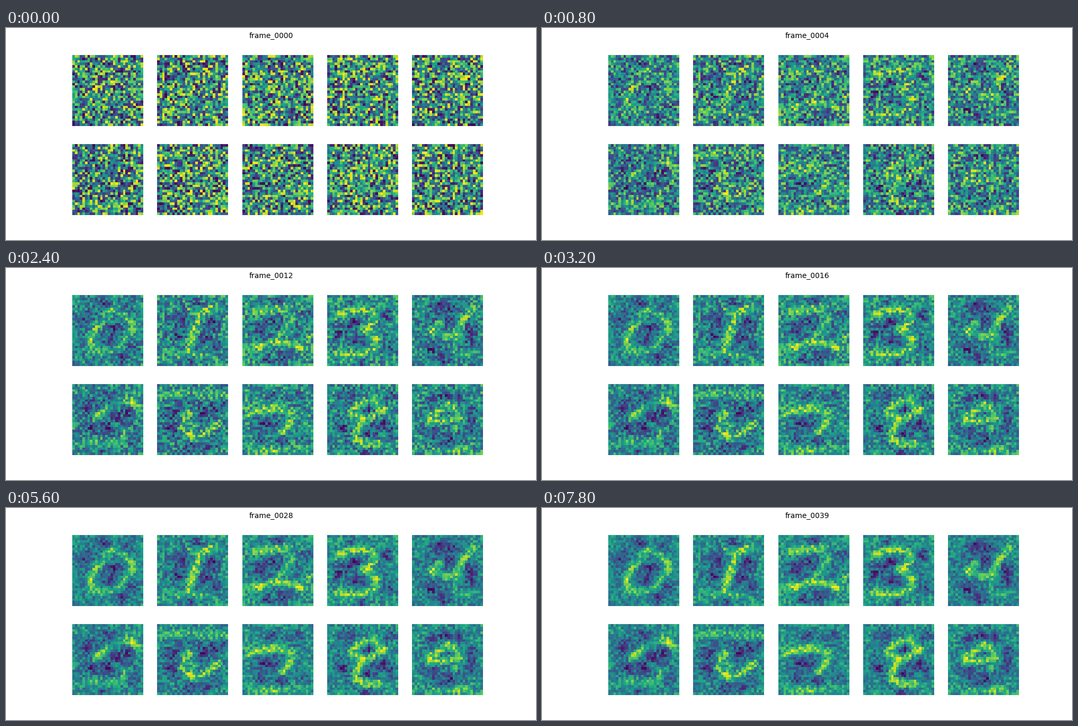
Write a matplotlib script that moves like this. It is 1000 by 400 pixels and loops after 8000 ms.

```python
import numpy as np
import matplotlib.pyplot as plt
from matplotlib.animation import FuncAnimation

SIZE = 28
FRAMES = 40
INTERVAL = 200

rng = np.random.default_rng(7)
gy, gx = np.mgrid[0:SIZE, 0:SIZE].astype(float)
window = np.exp(-(np.hypot(gx - 13.5, gy - 13.5) / 12.5) ** 6)
patterns = []


def segment_distance(p, q):
    """Distance of every cell to the segment p-q."""
    (x0, y0), (x1, y1) = p, q
    dx, dy = x1 - x0, y1 - y0
    t = ((gx - x0) * dx + (gy - y0) * dy) / (dx * dx + dy * dy)
    t = np.clip(t, 0, 1)
    return np.hypot(gx - x0 - t * dx, gy - y0 - t * dy)


def stroke(points, width=1.6):
    dist = np.min([segment_distance(p, q)
                   for p, q in zip(points, points[1:])], axis=0)
    return np.exp(-(dist / width) ** 2)


def blobs(points, radius):
    return np.max([np.exp(-((gx - x) ** 2 + (gy - y) ** 2) / radius ** 2)
                   for x, y in points], axis=0)


def add_digit(lines, hot, dark, faint=()):
    """Learned weights: bright strokes on a darker field."""
    lit = np.max([stroke(line) for line in lines]
                 + [0.65 * stroke(line) for line in faint], axis=0)
    hollow = 0.3 * window + 0.6 * blobs(dark, 2.5)
    patterns.append(0.62 * lit + 0.3 * blobs(hot, 1.9) - hollow * (1 - lit))


# 0
add_digit(
    lines=[[(15.5, 5), (19, 6.5), (23, 10.5), (23.4, 13), (21, 16), (17.5, 20.5),
            (12.5, 22.3), (7.5, 21.3), (6.5, 17.5), (8.2, 13.4), (11.5, 9.2),
            (15.5, 5)]],
    hot=[(23, 11), (6.8, 17), (7.5, 20.5)],
    dark=[(15.5, 13), (14.5, 17), (4, 8), (12, 2.5), (21, 3.5), (23, 21),
          (19, 24.5)])

# 1
add_digit(
    lines=[[(21, 4.6), (16.5, 6.5), (15.5, 10.3), (14.5, 14), (13, 17.6),
            (12, 21.8)]],
    faint=[[(12.5, 5), (16.5, 6)], [(7.5, 23.3), (17, 23)]],
    hot=[(14.8, 13.5), (13, 17.5)],
    dark=[(9, 10), (8, 15), (21.5, 10), (18.5, 16), (15, 2), (23, 20), (20, 12),
          (12, 26)])

# 2
add_digit(
    lines=[[(4, 6), (11, 5), (17.5, 4.5)],
           [(2.5, 19.5), (7, 20), (13, 17.5), (18, 18.5), (22.5, 20)]],
    faint=[[(17.5, 5), (19, 9), (16.5, 13.5), (13, 17)],
           [(22.5, 20), (26, 16)]],
    hot=[(22.5, 20.5), (6.5, 20), (10.5, 5)],
    dark=[(8, 12), (6, 12.5), (11.5, 11), (15.5, 24), (9, 25), (25.5, 8),
          (13, 1.5)])

# 3
add_digit(
    lines=[[(4, 7.5), (7, 5.8), (11.3, 5), (16.5, 6), (18.8, 8.5), (15.5, 12.5),
            (13.5, 13.2)],
           [(15.5, 13), (18.6, 16.5), (19, 19.6), (16.5, 22), (10.2, 23.3),
            (4.5, 21.8)]],
    hot=[(4.5, 22), (10.5, 5), (15, 12.8)],
    dark=[(11, 10), (7, 12), (11.3, 17.5), (4, 15), (9, 2), (23, 7), (24, 21),
          (13, 26)])

# 4
add_digit(
    lines=[[(10, 11), (7, 14), (10, 14.5), (13.4, 16.3), (17, 14.6), (19, 10),
            (22, 6.5), (24, 4.5)]],
    faint=[[(17, 15), (16.5, 19), (17, 23), (22, 22.5)]],
    hot=[(7.5, 14), (9.5, 13.5), (18, 13)],
    dark=[(14.5, 9), (15.5, 4), (10, 4), (7, 21), (11.5, 25.5), (23, 13.5),
          (23.5, 17)])

# 5
add_digit(
    lines=[[(20.5, 5), (23.5, 6.5), (25, 8)], [(13, 9.5), (10.5, 11.5), (9, 13)]],
    faint=[[(20, 5.5), (15.5, 8), (12, 11)],
           [(6.5, 21), (12.5, 22.8), (18.5, 21.5), (21, 18.5), (18.5, 17)]],
    hot=[(23.5, 6), (10.8, 11.5), (22, 7)],
    dark=[(21, 11.5), (16.7, 12.5), (8, 17), (13.5, 16.5), (5, 8), (13.5, 3.5),
          (11.5, 26), (24, 21)])

# 6
add_digit(
    lines=[[(12.5, 11), (10, 14), (9.6, 17), (12.5, 20), (16.7, 19.8), (21, 17.4),
            (23.4, 15)]],
    faint=[[(3, 3), (9.4, 3.4), (17.8, 3.8), (27, 4.4)], [(13, 14), (14, 18)]],
    hot=[(22.5, 15.5), (13, 20)],
    dark=[(22, 9), (25, 7.5), (18, 10.5), (5, 11.5), (5, 18), (12.5, 25.5),
          (19, 25), (23.5, 22)])

# 7
add_digit(
    lines=[[(2, 11), (6, 10), (11.3, 9), (16.5, 9.8), (19.3, 10.7), (18.6, 13.8),
            (15.5, 18)]],
    faint=[[(4, 25.3), (18, 25.3)]],
    hot=[(4, 10.5), (10, 9), (12, 25.5)],
    dark=[(11.3, 15), (8, 14.5), (11, 4.5), (21, 4), (24, 20), (7, 21),
          (14.5, 22)])

# 8
add_digit(
    lines=[[(9.2, 10.2), (12.3, 6.8), (17.5, 5.6), (21.5, 9.6), (17.5, 12.2),
            (13, 14), (11.7, 17), (10.4, 21), (15.5, 23), (20.5, 22.6)],
           [(9.2, 10.2), (13, 14)]],
    hot=[(21.8, 9.5), (12.8, 14), (11.7, 17), (15, 23)],
    dark=[(16, 9.2), (5, 17), (21.7, 16), (24.5, 17.5), (15, 19), (7, 4), (24, 4),
          (15, 26.5)])

# 9
add_digit(
    lines=[[(5, 12.7), (9.2, 11), (13.4, 7.9), (17.4, 9.6), (18.2, 12.7),
            (13.4, 13.8), (7, 14), (5, 12.7)]],
    faint=[[(17.5, 13), (16, 17)], [(8, 25.5), (22, 25.3)]],
    hot=[(13.5, 7.8), (7, 13), (18, 25.4)],
    dark=[(13, 10.8), (12, 4), (7, 5), (17.5, 4), (23, 16), (24, 11), (7, 18),
          (14.5, 21), (10, 22)])

noise = rng.uniform(-1, 1, (len(patterns), SIZE, SIZE))

fig, axes = plt.subplots(2, 5, figsize=(10, 4), dpi=100)
title = fig.suptitle("", fontsize=10)
images = []
for ax in axes.flat:
    images.append(ax.imshow(noise[0], cmap="viridis"))
    ax.axis("off")


def update(i):
    gain = 2.2 * (1 - np.exp(-i / 16))
    for image, start, pattern in zip(images, noise, patterns):
        weights = start + gain * pattern
        image.set_data(weights)
        image.set_clim(weights.min(), weights.max())
    title.set_text(f"frame_{i:04d}")
    return [*images, title]


anim = FuncAnimation(fig, update, frames=FRAMES, interval=INTERVAL, repeat=True,
                     repeat_delay=0)
plt.show()
```
